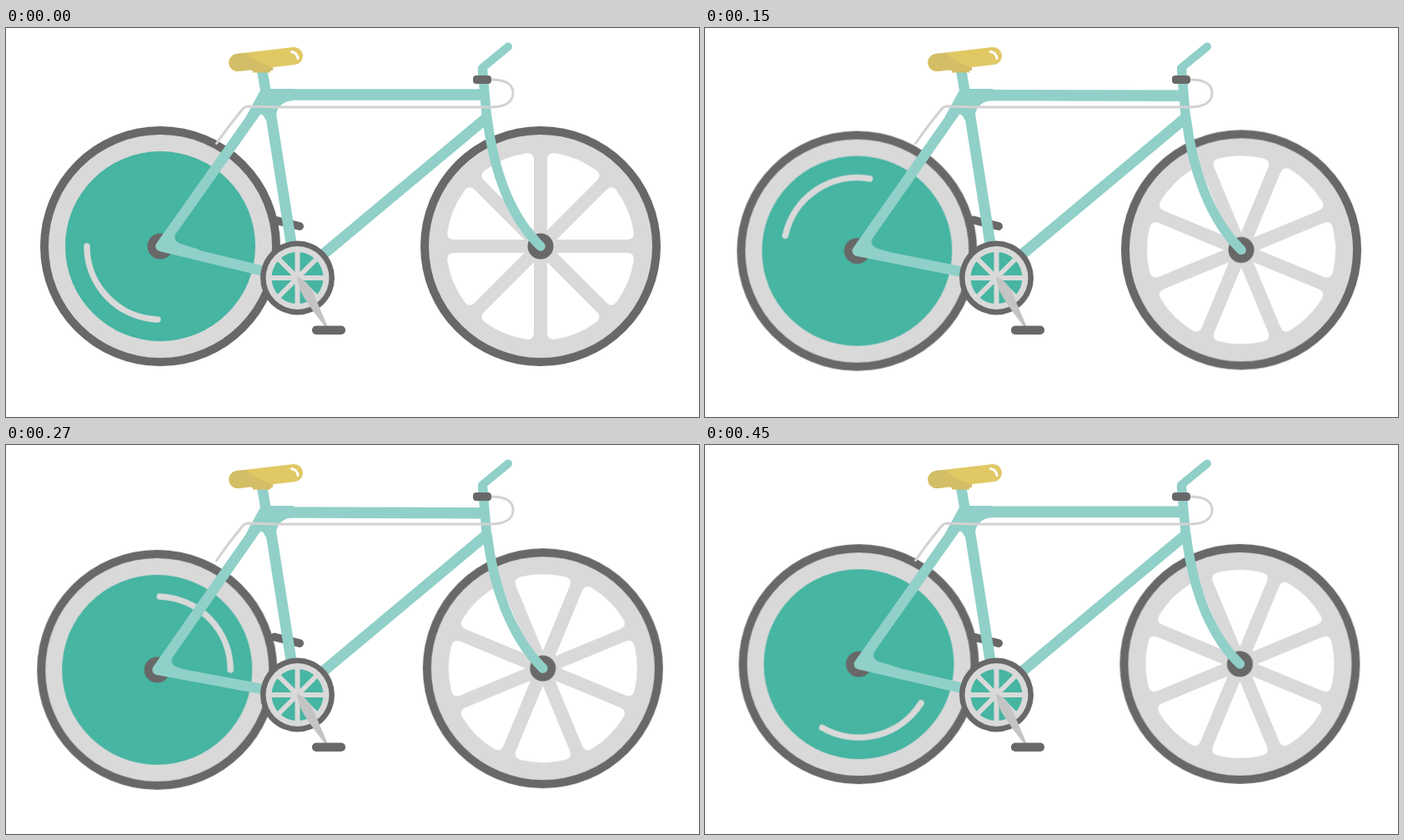
An HTML page that plays this animation: 831 by 467 pixels, repeating every 480 ms.

```html
<!DOCTYPE html>
<html lang="en">
<head>
<meta charset="utf-8">
<title>Bicycle</title>
<style>
  html, body { margin: 0; width: 100%; height: 100%; overflow: hidden; background: #fff; }
  svg { display: block; width: 831px; height: 467px; }

  .dark { fill: #686868; }
  .grey { fill: #d9d9d9; }
  .teal { fill: #46b5a2; }
  .tube { fill: #90d0c8; }
  .line { fill: none; stroke-linecap: round; stroke-linejoin: round; }
  .line.tube { stroke: #90d0c8; }
  .line.grey { stroke: #d9d9d9; }

  .rear, .front, .stays, .top, .fork { animation: 480ms steps(8, end) infinite; }
  .rear { animation-name: rear; }
  .front { animation-name: front; }
  .stays { animation-name: stays; }
  .top { animation-name: top; }
  .fork { animation-name: fork; }
  .disc { animation: disc 480ms steps(16, end) infinite; }
  .spokes { animation: spokes 480ms steps(16, end) infinite; }

  @keyframes rear { 50% { transform: translate(-4.3px, 9px); } }
  @keyframes front { 50% { transform: translate(3.2px, 7px); } }
  @keyframes stays {
    0%, 100% { d: path("M312 83L185.5 262L320 294.5"); }
    50% { d: path("M312 83L181.2 271L320 295.5"); }
  }
  @keyframes top {
    0%, 100% { d: path("M318 80L572 80"); }
    50% { d: path("M318 81L572 82"); }
  }
  @keyframes fork {
    0%, 100% { d: path("M577 108C584 165 602 224 641 262"); }
    50% { d: path("M577 108C584 167 604 229 644.2 269"); }
  }
  @keyframes disc { to { transform: rotate(320deg); } }
  @keyframes spokes { to { transform: rotate(360deg); } }
</style>
</head>
<body>
<svg viewBox="0 0 831 467">
  <defs>
    <path id="gap" fill="#fff" d="M20.9 0L98.9 32.3Q107.2 35.7 109.7 27.1A113 113 0 0 0 109.7 -27.1Q107.2 -35.7 98.9 -32.3Z"/>
    <g id="half">
      <use href="#gap" transform="rotate(22.5)"/>
      <use href="#gap" transform="rotate(67.5)"/>
      <use href="#gap" transform="rotate(112.5)"/>
      <use href="#gap" transform="rotate(157.5)"/>
    </g>
    <g id="rim">
      <circle class="dark" r="144"/>
      <circle class="grey" r="134"/>
    </g>
  </defs>

  <!-- wheels -->
  <g class="rear">
    <g transform="translate(185 262)">
      <use href="#rim"/>
      <circle class="teal" r="114"/>
      <g class="disc">
        <path class="line grey" stroke-width="7.5" style="fill:none" d="M-3.1 87.9A88 88 0 0 1 -88 0"/>
      </g>
      <circle class="dark" r="15.5"/>
    </g>
  </g>
  <g class="front">
    <g transform="translate(641 262)">
      <use href="#rim"/>
      <g class="spokes">
        <use href="#half"/>
        <use href="#half" transform="rotate(180)"/>
      </g>
      <circle class="dark" r="15.5"/>
    </g>
  </g>

  <!-- far pedal -->
  <path class="line" stroke="#686868" stroke-width="10" d="M322 230.5L352 238"/>

  <!-- frame -->
  <g class="line tube" style="fill:none">
    <path class="stays" stroke-width="12.5" d="M312 83L185.5 262L320 294.5"/>
    <path class="top" stroke-width="13.5" stroke-linecap="butt" d="M318 80L572 80"/>
    <path stroke-width="12.5" stroke-linecap="butt" d="M307 50L312.5 82"/>
    <path stroke-width="13" d="M317 100L342.5 262"/>
    <path stroke-width="13" d="M575.5 108.5L380 272"/>
    <path class="fork" stroke-width="11.5" d="M577 108C584 165 602 224 641 262"/>
    <path stroke-width="11.5" d="M571.5 50L576.5 108"/>
    <path stroke-width="10" d="M571 48L602 22.5"/>
  </g>
  <path class="tube" d="M306 73H345V87Q326 88 323.5 106L311 110Q309 103 304.5 103.5Q301.5 104 298 109L288 106Z"/>
  <path class="tube rear" d="M185 262L209 237L204.5 244.5C200 252 203 257 211 259.5L232 266L228 272Z"/>

  <!-- cable and clamp -->
  <path class="line" stroke="#d2d2d2" stroke-width="3" d="M580 62C600 61.5 608 68 608 78C608 89 598 95 580 95H325L291 94Q286.500 94 284 97Q268 116 252.500 138.500"/>
  <rect class="dark" x="560" y="57" width="22" height="10" rx="4"/>

  <!-- saddle -->
  <path fill="#d3bd66" d="M294 45H320V51H317V53.500H296V51H294Z"/>
  <path class="line" stroke="#e0c865" stroke-width="21" d="M277.500 41.500L345.500 33.500"/>
  <path fill="#d3bd66" d="M276.300 31.100L288 29.700Q300 42 320 47L278.700 51.900A10.500 10.500 0 0 1 276.300 31.100Z"/>
  <path class="line" stroke="#fff" stroke-width="3" d="M342.500 28.500Q349 29.500 350 36.500"/>

  <!-- chainring, crank and near pedal -->
  <g transform="translate(349.5 300)">
    <circle class="dark" r="44.500"/>
    <circle class="grey" r="38"/>
    <circle class="teal" r="31"/>
    <path stroke="#d9d9d9" stroke-width="6" d="M-32 0H32M0 -32V32M-22.500 -22.500L22.500 22.500M-22.500 22.500L22.500 -22.500"/>
  </g>
  <path fill="#c4c4c4" d="M349 298Q362 304 368 317Q377 338 385.500 358H382Q369 342 357 323Q350 311 349 298Z"/>
  <rect class="dark" x="367" y="357.500" width="40" height="10.500" rx="5"/>
</svg>
</body>
</html>
```
